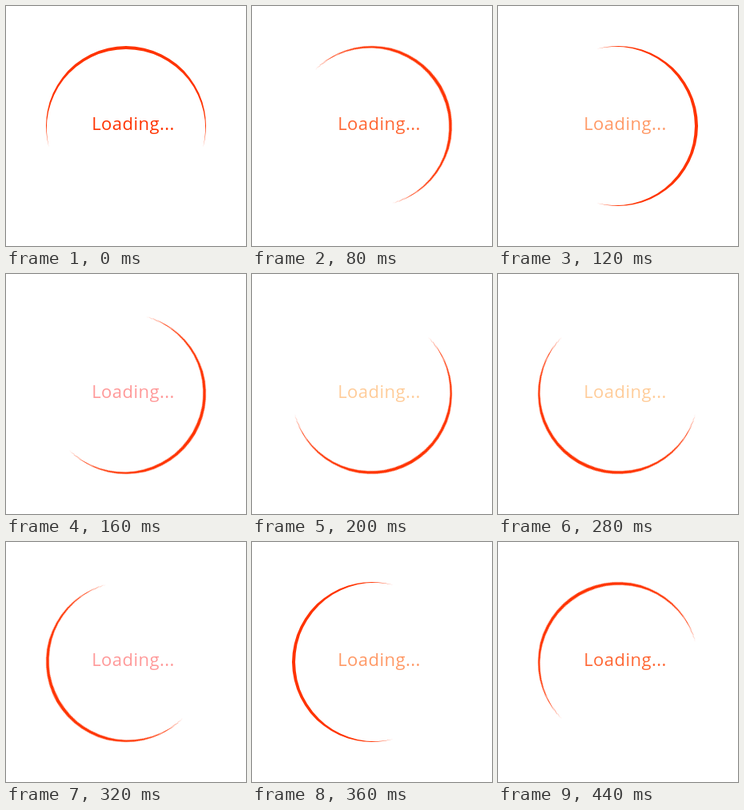
Write an HTML page that moves like this. It is 300 px wide and 300 px high and loops after 0.48 s.

```html
<!DOCTYPE html>
<html lang="en">
<head>
<meta charset="utf-8">
<title>Loading</title>
<style>
html, body { margin: 0; width: 100%; height: 100%; overflow: hidden; background: #fff; }
svg { display: block; width: 300px; height: 300px; }
.arc {
  fill: #f30;
  transform-origin: 150px 150px;
  animation: spin 480ms steps(12) infinite;
}
.label {
  font: 22px "Open Sans", "Noto Sans", sans-serif;
  letter-spacing: .45px;
  animation: fade 480ms step-end infinite;
}
@keyframes spin { to { transform: rotate(360deg); } }
@keyframes fade {
  0% { fill: #f30; }
  8.333% { fill: #f63; }
  25% { fill: #f96; }
  33.333% { fill: #f99; }
  41.667% { fill: #fc9; }
  50% { fill: #fcc; }
  58.333% { fill: #fc9; }
  66.667% { fill: #f99; }
  75% { fill: #f96; }
  83.333%, 100% { fill: #f63; }
}
</style>
</head>
<body>
<svg viewBox="0 0 300 300">
  <!-- crescent: circle r100 at (150,150) minus circle r99.2 at (150,153.2) -->
  <path class="arc" d="M53.57 176.5A100 100 0 1 1 246.43 176.5A99.2 99.2 0 1 0 53.57 176.5Z"/>
  <text class="label" x="107.2" y="155">Loading...</text>
</svg>
</body>
</html>
```
